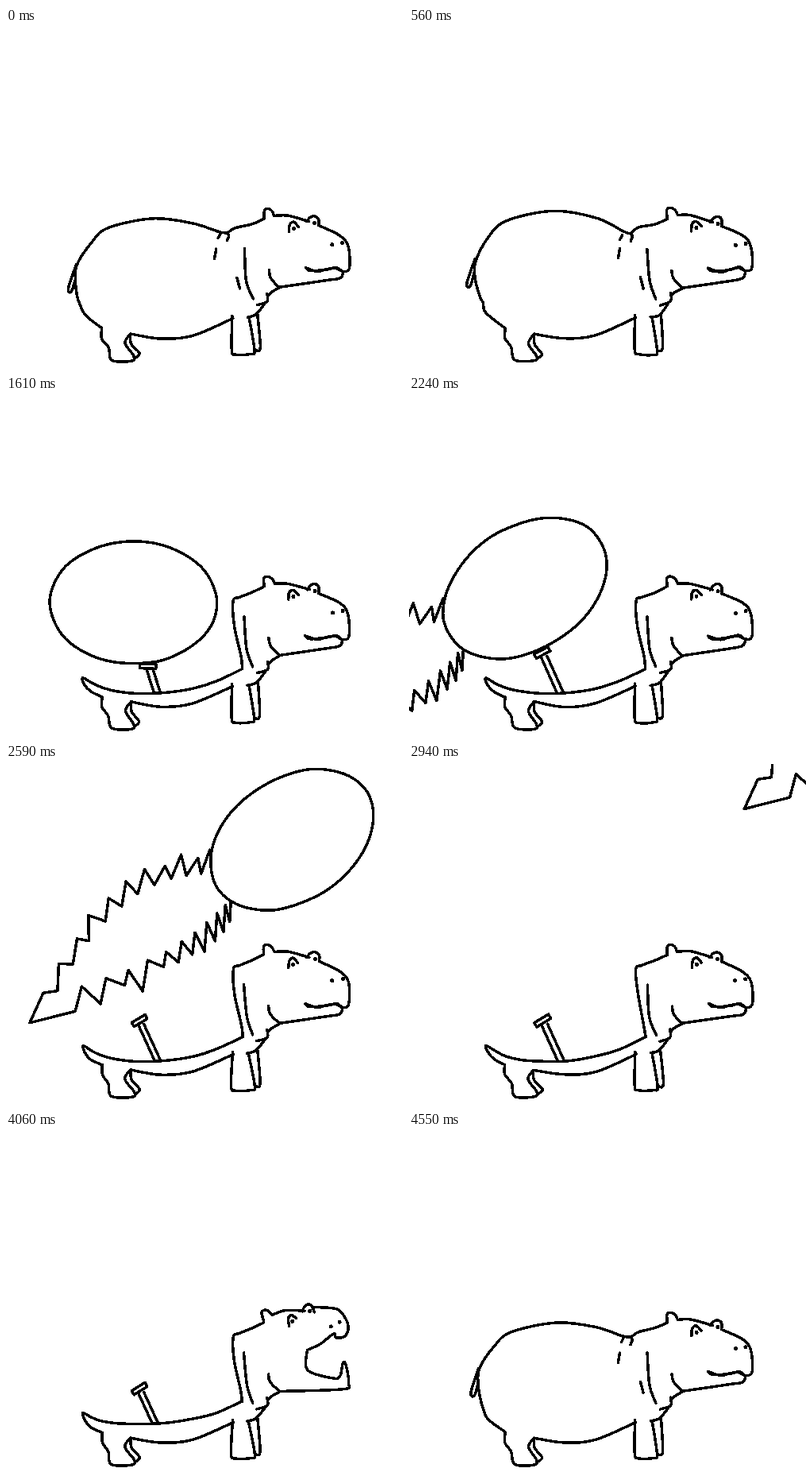
Animation, 500 px wide and 428 px high, one loop 4.62 s. Source, as an HTML page:

```html
<!DOCTYPE html>
<html lang="en">
<head>
<meta charset="utf-8">
<title>Hippo</title>
<style>
  html, body { margin: 0; width: 100%; height: 100%; overflow: hidden; background: #fff; }
  svg { display: block; width: 100vw; height: 100vh; }
  path { fill: none; stroke: #000; stroke-width: 3.5; stroke-linecap: round; stroke-linejoin: round; shape-rendering: crispEdges; }
  .solid { fill: #fff; }
  .mask { fill: #fff; stroke: none; }
  .dot { stroke-width: 5; }
</style>
</head>
<body>
<svg id="stage" viewBox="0 0 500 428"></svg>
<script>
const LOOP = 4620, STEP = 70;
const TEAR = 1190, LAUNCH = 2240, REGROW = 3990;
const stage = document.getElementById('stage');

const pts = s => s.split(' ').map(p => p.split(',').map(Number));
const lerp = (a, b, k) => a + (b - a) * k;
const mixPt = (a, b, k) => a.map((v, i) => lerp(v, b[i], k));
const mix = (a, b, k) => a.map((p, i) => mixPt(p, b[i], k));
const move = (a, dx, dy) => a.map(([x, y]) => [x + dx, y + dy]);
const ramp = (t, a, b) => Math.min(1, Math.max(0, (t - a) / (b - a)));
const ease = k => k * k * (3 - 2 * k);

function turn(list, [ox, oy], deg, sx = 1) {
  const c = Math.cos(deg * Math.PI / 180), s = Math.sin(deg * Math.PI / 180);
  return list.map(([x, y]) => [ox + ((x - ox) * c - (y - oy) * s) * sx, oy + (x - ox) * s + (y - oy) * c]);
}

function oval([x, y], rx, ry, deg) {
  const ring = Array.from({ length: 20 }, (_, i) => {
    const a = i * Math.PI / 10;
    return [x + rx * Math.cos(a), y + ry * Math.sin(a)];
  });
  return turn(ring, [x, y], deg);
}

// Saw teeth along a bent path; the tooth vector changes from first to last
function saw([from, bend, to], first, last, count, seed) {
  const out = [];
  for (let i = 0; i < count; i++) {
    const k = Math.pow(i / (count - 1), 1.2);
    const root = mixPt(mixPt(from, bend, k), mixPt(bend, to, k), k);
    const rnd = Math.abs(Math.sin(seed + i * 12.9) * 437.5) % 1;
    const [tx, ty] = mixPt(first, last, k);
    const size = 0.6 + 0.6 * rnd;
    out.push(root, [root[0] + tx * size, root[1] + ty * size]);
  }
  return out;
}

// Outline from the neck over the back to the rump
const back = {
  calm: pts('279,258 268,257 235,246 185,240 128,252 107,270 89,298 87,318 90,338 93,347 100,362 121,378'),
  full: pts('280,263 275,249 242,211 170,192 103,205 72,242 64,285 71,314 83,334 94,340 86,343 121,378'),
  bare: pts('298,344 265,359 235,368 200,374 165,374 140,372 122,368 109,362 97,355 99,363 107,372 121,379')
};
const neck = {
  calm: pts('279,268 281,262 280,258 283,255 290,251 310,247 325,240'),
  bare: pts('298,344 296,328 288,290 286,258 294,253 311,247 325,240')
};
const tail = pts('88,298 78,328 82,332 87,316');
const belly = pts('157,385 195,391 235,387 286,365');
const creases = ['270,259 267,265', '291,314 295,328'].map(pts);
const fold = pts('265,278 263,290');
const limbs = [
  '121,379 121,391 129,402 133,418 158,419 161,413 150,397 157,385',
  '157,385 158,398 168,410 162,416',
  '285,362 284,405 289,411 308,411 313,406 306,365',
  '317,361 320,402 314,406',
  '331,305 333,315 344,327',
  '345,327 334,333 330,337',
  '329,334 329,344 316,349',
  '326,347 315,361 304,364',
  '300,278 303,318 311,341'
].map(pts);

// The skull tips back as one piece; snout and jaw have a shut and an open pose
const skull = [
  '325,240 325,229 330,227 335,230 338,236',
  '338,236 355,236 382,244',
  '379,244 383,239 389,237 394,241 394,249',
  '356,256 357,247 362,244 368,250'
].map(pts);
const dots = pts('362,252 389,246 411,273 424,271');
const snout = [
  '394,249 420,261 431,275 432,302 424,306 415,302 403,304 392,307 377,302',
  '386,220 416,223 428,235 431,247 426,257 416,259 413,254 396,267 379,274'
].map(pts);
const jaw = [
  '377,302 383,306 405,304 416,301 422,305 424,308 420,315 405,318 343,327',
  '379,274 380,300 412,310 421,306 424,291 428,293 432,316 424,324 343,327'
].map(pts);

const flame = [
  ...saw([[46, 285], [-70, 280], [-149, 432]], [-3, -28], [-28, 4], 11, 2),
  [-184, 472],
  ...saw([[69, 315], [15, 385], [-119, 427]], [-2, 33], [-8, 32], 11, 5).reverse()
];

let frame = 0, used = 0;
const pool = [];

// Hand-drawn wobble; nearby points shift together so joints hold
function boil([x, y]) {
  const a = frame * 2.1;
  return [x + 0.5 * Math.sin(x * 0.13 + y * 0.07 + a), y + 0.5 * Math.sin(y * 0.11 - x * 0.09 + a * 1.7)];
}

const lines = (list, closed) => 'M' + list.map(boil).join('L') + (closed ? 'Z' : '');

function curve(list, closed) {
  const p = list.map(boil), n = p.length;
  const at = i => closed ? p[(i + n) % n] : p[Math.min(n - 1, Math.max(0, i))];
  let d = 'M' + p[0];
  for (let i = 0; i < (closed ? n : n - 1); i++) {
    const [a, b, c, e] = [at(i - 1), at(i), at(i + 1), at(i + 2)];
    const c1 = b.map((v, j) => v + (c[j] - a[j]) / 6);
    const c2 = c.map((v, j) => v - (e[j] - b[j]) / 6);
    d += `C${c1} ${c2} ${c}`;
  }
  return d + (closed ? 'Z' : '');
}

function ink(d, cls = '') {
  let el = pool[used];
  if (!el) {
    el = document.createElementNS('http://www.w3.org/2000/svg', 'path');
    pool.push(stage.appendChild(el));
  }
  used++;
  el.setAttribute('d', d);
  el.setAttribute('class', cls);
}

function drawStick(tilt, dx, dy) {
  const [x, y] = mixPt([178.5 + dx, 340 + dy], [168, 323], tilt);
  for (const side of [-4, 4]) ink(lines([[x + side + 2, y + 4], [191 + side, 374]]));
  const cap = [[x - 10, y - 3], [x + 10, y - 3], [x + 10, y + 3], [x - 10, y + 3]];
  ink(lines(turn(cap, [x, y], -30 * tilt), true), 'solid');
}

function drawBody(swell, regrow) {
  const bare = regrow !== null;
  const outline = bare ? mix(back.bare, back.calm, regrow) : mix(back.calm, back.full, swell);
  ink(curve(outline) + 'L' + belly.join('L') + 'Z', 'mask');
  ink(curve(outline));
  ink(curve(bare ? mix(neck.bare, neck.calm, regrow) : neck.calm));
  ink(curve(belly));
  if (!bare || regrow > 0.8) {
    ink(curve(move(tail, -23 * swell, -36 * swell)));
    ink(lines(move(creases[0], -9 * swell, 6 * swell)));
    ink(lines(creases[1]));
    if (swell < 0.7) return ink(lines(fold));
    ink(curve(oval([167, 358], 29, 3, 0), true));
    ink(curve(oval([265, 322], 20, 4, -53), true));
  }
}

function drawHead(open) {
  const tip = list => turn(list, [317, 236], -16.6 * open, 1 - 0.08 * open);
  skull.forEach(s => ink(curve(tip(s))));
  [snout, jaw].forEach(([shut, wide]) => ink(curve(mix(shut, wide, open))));
  tip(dots).forEach(p => ink(lines([p, p]), 'dot'));
}

function drawBall(t, tilt, dx, dy) {
  const fly = Math.pow(Math.max(0, t - LAUNCH) / 700, 1.5);
  const fx = 606 * fly, fy = -415 * fly;
  const grow = ramp(t, 2030, LAUNCH);
  if (grow > 0) {
    const f = flame.map(p => mixPt([58, 300], p, grow));
    ink(lines(move(f, fx, fy)), 'solid');
  }
  const [x, y] = mixPt([160.5 + dx, 260 + dy], [146, 242], tilt);
  ink(curve(oval([x + fx, y + fy], lerp(105, 112, tilt), 77, -33 * tilt), true), 'solid');
}

function draw(t) {
  used = 0;
  const torn = t >= TEAR;
  const swell = torn ? 0 : ramp(t, 420, 1120);
  const regrow = torn ? ease(ramp(t, REGROW, 4480)) : null;
  const open = ramp(t, 3400, 3570) - ramp(t, 4200, 4480);
  const tilt = ease(ramp(t, 1750, LAUNCH));

  // The ball springs up out of the back, then settles
  const up = ease(ramp(t, TEAR, 1400)), settle = ease(ramp(t, 1400, 1610));
  const dx = 8 - 12 * up + 4 * settle, dy = 12 - 21 * up + 9 * settle;

  if (torn && regrow < 0.9) drawStick(tilt, dx, dy);
  drawBody(swell, regrow);
  limbs.forEach(l => ink(curve(l)));
  drawHead(open);
  if (torn && t < 3300) drawBall(t, tilt, dx, dy);

  for (let i = used; i < pool.length; i++) pool[i].setAttribute('d', '');
}

let start = null, shown = -1;
function tick(now) {
  if (start === null) start = now;
  frame = Math.floor(((now - start) % LOOP) / STEP);
  if (frame !== shown) {
    shown = frame;
    draw(frame * STEP);
  }
  requestAnimationFrame(tick);
}
draw(0);
requestAnimationFrame(tick);
</script>
</body>
</html>
```
